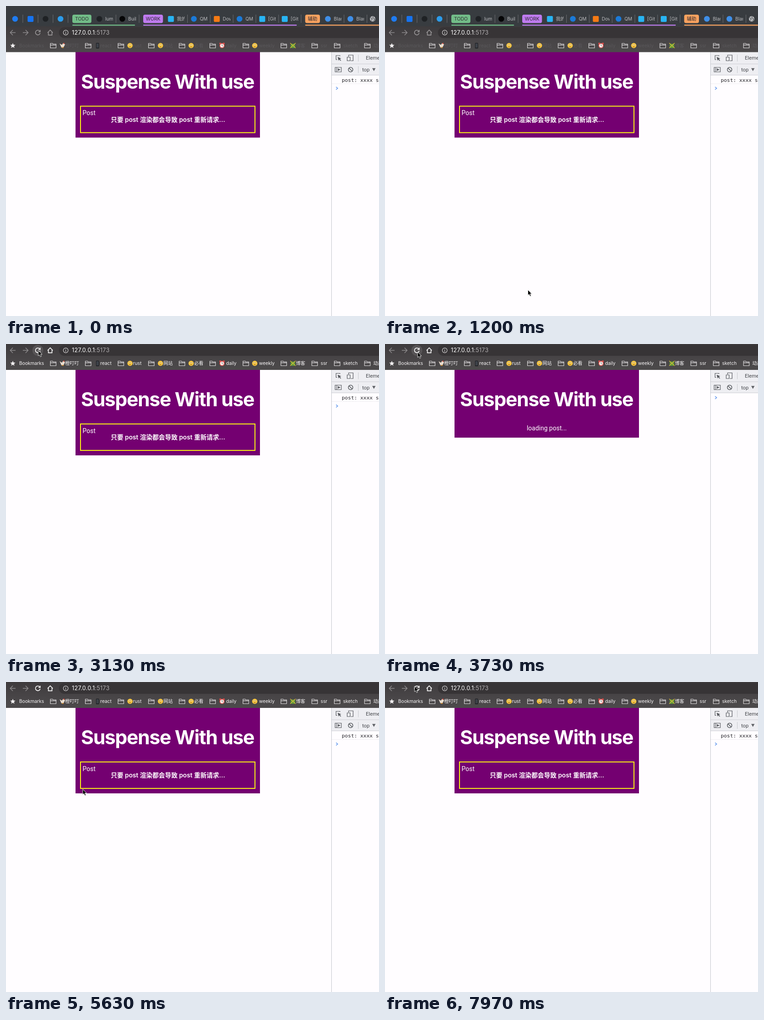
An HTML page that plays this animation: 821x682 px, repeating every 8 s.

```html
<!DOCTYPE html>
<html lang="zh">
<head>
<meta charset="utf-8">
<title>Suspense With use</title>
<style>
html, body { margin: 0; width: 100%; height: 100%; overflow: hidden; background: #fffdff; }
svg { display: block; }
#stage { width: 100vw; height: 100vh; }
text { font-family: Inter, "Noto Sans CJK SC", "Noto Sans CJK", sans-serif; white-space: pre; }
.sys { font-family: Roboto, "Noto Sans CJK SC", sans-serif; }
.mono { font-family: "DejaVu Sans Mono", monospace; }
</style>
</head>
<body>
<svg id="stage" viewBox="0 0 821 682" xmlns="http://www.w3.org/2000/svg">
  <defs>
    <linearGradient id="barFill" x1="0" y1="0" x2="0" y2="1">
      <stop offset="0" stop-color="#3e3b3d"/>
      <stop offset=".55" stop-color="#484547"/>
      <stop offset="1" stop-color="#4c4a4b"/>
    </linearGradient>
  </defs>
  <rect width="821" height="682" fill="#fffdff"/>
  <g id="win">
    <g id="page"></g>
    <g id="tools"></g>
    <g id="tabs" transform="translate(0 -44.5)"></g>
    <g id="bar"></g>
  </g>
  <g id="cursor">
    <g transform="scale(.87)">
      <path d="M0 0V13.6L3.1 10.8L5.4 16L7.9 14.9L5.7 9.9H9.8Z" transform="translate(.6 1.2)" fill="#000" opacity=".18"/>
      <path d="M0 0V13.6L3.1 10.8L5.4 16L7.9 14.9L5.7 9.9H9.8Z" fill="#000" stroke="#fff" stroke-width="1" stroke-linejoin="round"/>
    </g>
  </g>
</svg>
<script>
const LOOP = 8000, STRIP = 44.5;
const $ = id => document.getElementById(id);

const text = (x, y, s, size, fill, extra = '') =>
  `<text x="${x}" y="${y}" font-size="${size}" fill="${fill}" ${extra}>${s}</text>`;
const rect = (x, y, w, h, fill, extra = '') =>
  `<rect x="${x}" y="${y}" width="${w}" height="${h}" fill="${fill}" ${extra}/>`;
const disc = (x, y, r, fill, extra = '') =>
  `<circle cx="${x}" cy="${y}" r="${r}" fill="${fill}" ${extra}/>`;
const line = (d, stroke, w = 1.2, extra = '') =>
  `<path d="${d}" fill="none" stroke="${stroke}" stroke-width="${w}" ${extra}/>`;

// Web page
$('page').innerHTML =
  rect(153, 40, 406, 205, '#740071', 'id="card"') +
  text(355.6, 137.3, 'Suspense With use', 43, '#fff',
    'font-weight="700" letter-spacing="-1.35" text-anchor="middle"') +
  `<g id="post">
    ${rect(164, 175.9, 384, 58.2, 'none', 'stroke="#fbf712" stroke-width="2"')}
    ${text(168.5, 195.5, 'Post', 14, '#fff', 'class="sys"')}
    ${text(356.5, 210, '只要 post 渲染都会导致 post 重新请求...', 13.8, '#fff',
      'font-weight="600" text-anchor="middle"')}
  </g>` +
  text(356, 190, 'loading post...', 14, '#fff', 'class="sys" text-anchor="middle" id="loading"') +
  text(623.5, 73, '841px × 1089px', 12.2, '#3a393c', 'class="sys" id="size"');

// Developer tools
const ink = '#55585d';
$('tools').innerHTML =
  rect(716, 40, 105, 642, '#fffdff') +
  rect(716, 40, 105, 68, '#eeeef2') +
  line('M716 83H821M716 107.5H821', '#cdced4', 1) +
  line('M716.5 40V682', '#c3c5cc', 1) +
  line('M735 66V64.5H726.5V73.5H729', ink) +
  `<path d="M730 67.5L738 71L734.8 72L737.6 75.2L736.4 76.3L733.5 73.2L732 76Z" fill="${ink}"/>` +
  line('M754 67V63.5H764V76H759M751 68H757.5V76H751Z', ink) +
  line('M775.5 62.5V77.5M775.5 88V103', '#c6c8ce', 1) +
  text(792, 73.8, 'Elements', 11.3, '#45474c', 'class="sys"') +
  line('M724.5 90.5H738V100.5H724.5ZM728 90.5V100.5', ink) +
  `<path d="M730.5 92.5L736 95.5L730.5 98.5Z" fill="${ink}"/>` +
  disc(758.5, 95.5, 5, 'none', `stroke="${ink}" stroke-width="1.5"`) +
  line('M755 92L762 99', ink, 1.5) +
  text(784, 99.5, 'top', 11.3, '#45474c', 'class="sys"') +
  `<path d="M806 92.3H813.5L809.75 98.7Z" fill="#606267"/>` +
  `<g id="log">${text(739, 122, 'post: xxxx s', 11.3, '#27262b', 'class="mono"')}
    ${line('M717 126.5H821', '#efedf1', 1)}</g>` +
  `<g id="prompt">${line('M726.5 115L730 118L726.5 121', '#5b93ec', 1.5)}</g>`;

// Tab strip
const chip = (x, w, label, color, end) =>
  rect(x, 19, w, 18.5, color, 'rx="4"') +
  text(x + w / 2, 32, label, 10.5, '#2d2a30', 'text-anchor="middle"') +
  rect(x, 41, end - x, 2.2, color, 'rx="1"');
const tab = (x, label, color, round) =>
  (round ? disc(x, 28.3, 6.3, color) : rect(x - 6.5, 22, 13, 13, color, 'rx="2"')) +
  (label ? `<svg x="${x + 13}" y="18" width="17" height="20">${text(0, 13.8, label, 10.3, '#b9babd')}</svg>` : '');
const seps = [37, 70.5, 103.5, 136.5, 242, 293, 399.5, 449.5, 500, 550, 600, 649.5, 744, 794.5];

$('tabs').innerHTML =
  rect(0, 0, 821, 46, '#383c40') +
  line(seps.map(x => `M${x} 19V37`).join(''), '#6b6d71', 1) +
  [
    [20, '', '#1f7cf2', 1], [54, '', '#1673f0'], [87, '', '#1f2225', 1], [120, '', '#2c9bea', 1],
    [205.5, 'lumen', '#1f2225', 1], [256, 'Build', '#050506', 1], [363, '我的', '#28b4f3'],
    [413.5, 'QMS', '#1b7ad8', 1], [464, 'Dow', '#f57a14'], [514, 'QMS', '#1b7ad8', 1],
    [564, '[Git', '#28b4f3'], [613.5, '[Git', '#28b4f3'], [708.5, 'Blan', '#3f8fe8', 1],
    [758, 'Blan', '#3f8fe8', 1]
  ].map(t => tab(...t)).join('') +
  chip(146, 42, 'TODO', '#72bd88', 284) +
  chip(302, 43.5, 'WORK', '#bf7bef', 640) +
  chip(658.5, 32.5, '辅助', '#f9a25f', 821) +
  disc(807, 28.3, 6, '#b9bbbe') +
  line('M802.5 25.5L806 28L804.5 32M808 22.8L807.5 26L811.5 28.5L809.5 32.5', '#55585b', 1.4);

// Toolbar and bookmarks
const folder = x =>
  line(`M${x + .6} 47.7V37.7H${x + 5.3}L${x + 6.7} 39.2H${x + 13.2}V47.7ZM${x + .6} 41.4H${x + 13.2}`, '#e6e4e5', 1.1, 'stroke-linejoin="round"');
const face = x =>
  disc(x, 42.5, 5.8, '#f8c63e') + disc(x - 2, 41, 1.2, '#fff') + disc(x + 2, 41, 1.2, '#fff') +
  disc(x - 2, 41, .7, '#4b3520') + disc(x + 2, 41, .7, '#4b3520') + line(`M${x - 2} 45.3H${x + 2}`, '#83501f', 1);
const emoji = {
  bird: x => `<path d="M${x - 6} 38L${x - 1} 41L${x + 2} 37L${x + 6} 40L${x + 3} 46L${x - 2} 47Z" fill="#e9ddcf"/>` +
    rect(x - 1, 46, 4, 2, '#c98a35') + disc(x + 3.5, 37.8, 1.4, '#d6483b'),
  phone: x => rect(x - 3.5, 36.5, 7, 12.5, '#222327', 'rx="1.5"') + rect(x - 2.4, 38, 4.8, 9, '#3d4149'),
  face,
  clock: x => disc(x - 4, 38, 2, '#d94b48') + disc(x + 4, 38, 2, '#d94b48') + disc(x, 42.7, 5.6, '#dc5350') +
    disc(x, 42.7, 4, '#f8efec') + line(`M${x} 40V42.7L${x + 2} 44`, '#444', .9),
  leaf: x => rect(x - 5, 38.5, 10, 9.5, '#5c9c39', 'rx="3"') +
    line(`M${x - 6} 37L${x + 6} 48M${x + 6} 37L${x - 6} 48`, '#d5b93a', 1.4)
};
const marks = [
  [97, '橙叮叮', 130, 'bird', 124], [174, 'react', 207.5, 'phone', 201.5], [246, 'rust', 279.5, 'face', 273],
  [313, '网站', 346.5, 'face', 340], [380.5, '必看', 414, 'face', 407.5], [448, 'daily', 484.5, 'clock', 475.5],
  [521, 'weekly', 557, 'face', 547.5], [604.5, '博客', 638, 'leaf', 631.5], [672.5, 'ssr', 692.5],
  [722, 'sketch', 742], [788.5, '动画', 808.5]
];

$('bar').innerHTML =
  rect(0, 0, 821, 57, 'url(#barFill)') +
  line('M21 14H9.5M15 8.3L9.3 14L15 19.7M37 14H48.5M43 8.3L48.7 14L43 19.7', '#8d8a8c', 1.5) +
  disc(70, 14, 12, '#575456', 'id="hover"') +
  `<g id="nav" fill="none" stroke-width="1.6">
    <path d="M74.4 11A5.2 5.2 0 1 0 75.2 14.8"/><path d="M75.3 8.3V12.2H71.3"/>
    <path d="M91.5 14.2L97.3 8.4L103.1 14.2M93.3 13V19.4H101.3V13"/>
  </g>` +
  rect(116.5, 2, 730, 24, '#373436', 'rx="12"') +
  disc(131.5, 14, 5.3, 'none', 'stroke="#cfcdce" stroke-width="1.2"') +
  line('M131.5 13.2V17M131.5 10.8V12.1', '#cfcdce', 1.3) +
  text(145, 18.3, '127.0.0.1<tspan fill="#b3b0b2">:5173</tspan>', 12.6, '#fff', 'letter-spacing=".3"') +
  `<path d="M15 37L16.6 40.8L20.7 41.1L17.6 43.8L18.6 47.8L15 45.6L11.4 47.8L12.4 43.8L9.3 41.1L13.4 40.8Z" fill="#f1eff0"/>` +
  marks.map(m => folder(m[0]) + (m[3] ? emoji[m[3]](m[4]) : '')).join('') +
  `<g id="names">${text(29, 46.3, 'Bookmarks', 10.3, 'inherit')}${
    marks.map(m => text(m[2], 46.3, m[1], 10.3, 'inherit')).join('')}</g>`;

// Pointer route: time, x, y
const route = [
  [1040, 334, 692], [1200, 314.7, 625], [1700, 205, 387], [2070, 89.8, 112.3], [2200, 84, 105],
  [2540, 94, 193], [2760, 86, 130], [3130, 71, 14.3], [3650, 71, 14.3], [4200, 90, 96],
  [4570, 99, 144], [5000, 128, 208], [5500, 160, 226], [6150, 199, 280], [6600, 204, 267.5],
  [7100, 206, 264], [7550, 199, 260], [7970, 65, 9.5], [8000, 65, 9.5]
];

// Monotone cubic, so that rests stay at rest
function along(t, c) {
  let i = 0;
  while (i < route.length - 2 && t >= route[i + 1][0]) i++;
  const slope = j => route[j] && route[j + 1]
    ? (route[j + 1][c] - route[j][c]) / (route[j + 1][0] - route[j][0]) : 0;
  const tangent = j => {
    const a = slope(j - 1), b = slope(j);
    return a * b > 0 ? 2 * a * b / (a + b) : 0;
  };
  const [a, b] = [route[i], route[i + 1]], h = b[0] - a[0];
  const u = Math.min(1, Math.max(0, (t - a[0]) / h)), v = 1 - u;
  return a[c] * v * v * (1 + 2 * u) + b[c] * u * u * (1 + 2 * v) +
    h * u * v * (tangent(i) * v - tangent(i + 1) * u);
}

const ease = u => { u = Math.min(1, Math.max(0, u)); return u * u * (3 - 2 * u); };
const show = (id, on) => $(id).setAttribute('visibility', on ? 'visible' : 'hidden');
const within = (t, a, b) => t >= a && t < b;

function draw(t) {
  const focused = t >= 1740;
  const loading = within(t, 3450, 5460);
  const drop = STRIP * (1 - ease((t - 1750) / 200));
  const x = along(t, 1), y = along(t, 2);

  $('win').setAttribute('transform', `translate(0 ${drop})`);
  $('nav').setAttribute('stroke', focused ? '#fff' : '#9a9799');
  $('names').setAttribute('fill', focused ? '#f7f5f6' : '#59575a');
  $('card').setAttribute('height', loading ? 166 : 205);
  show('post', !loading);
  show('log', !loading);
  show('loading', loading);
  show('size', within(t, 1850, 2950));
  show('hover', focused && t < 7900 && Math.hypot(x - 70, y - 14) < 12);
  $('prompt').setAttribute('transform', `translate(0 ${loading ? 0 : 18.5})`);
  show('cursor', t >= 1040);
  $('cursor').setAttribute('transform', `translate(${x} ${y})`);
}

const start = performance.now();
function tick() {
  draw((performance.now() - start) % LOOP);
  requestAnimationFrame(tick);
}
tick();
</script>
</body>
</html>
```
